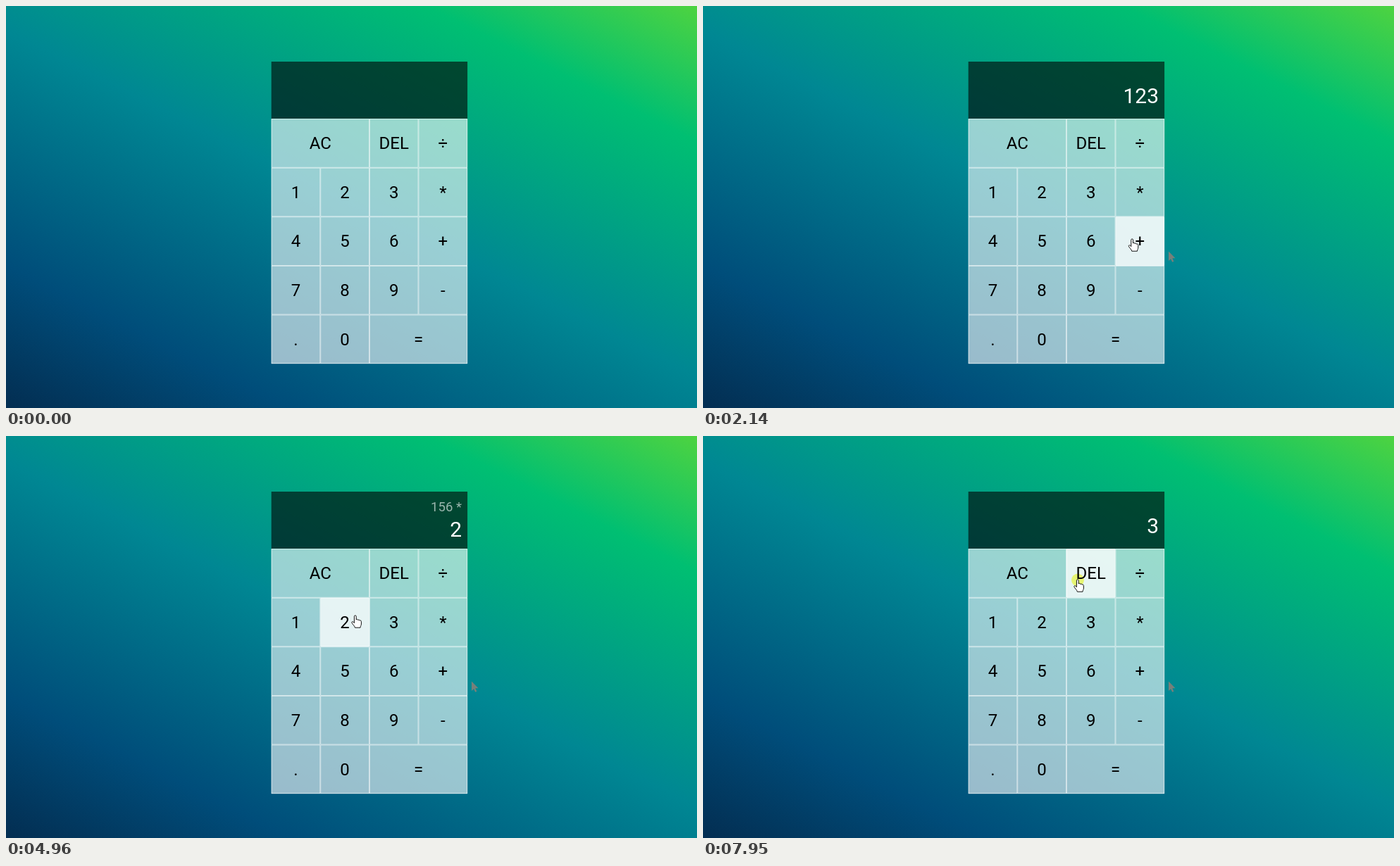
Recreate the animation shown at these times as an HTML page with a canvas. Size 981x571 px, loop 8 s.

```html
<!DOCTYPE html>
<html lang="en">
<head>
<meta charset="utf-8">
<title>Calculator</title>
<style>
html, body { margin: 0; width: 100%; height: 100%; overflow: hidden; background: #008793; }
canvas { display: block; }
</style>
</head>
<body>
<canvas id="stage" width="981" height="571"></canvas>
<script>
const ctx = document.getElementById('stage').getContext('2d');
const LOOP = 8000, STEP = 66.9, ENTER = 120, HOLD = 70;
const LEFT = 376.7, TOP = 79, KEYS_TOP = 160.1, CELL = 69.6, WIDTH = 4 * CELL;

// Each name fills as many columns as it appears in its row.
const rows = ['AC AC DEL ÷', '1 2 3 *', '4 5 6 +', '7 8 9 -', '. 0 = ='];
const keys = rows.flatMap((row, r) => {
  const names = row.split(' ');
  return [...new Set(names)].map(label => ({
    label,
    x: LEFT + names.indexOf(label) * CELL,
    y: KEYS_TOP + r * CELL,
    w: names.filter(n => n === label).length * CELL
  }));
});

// Pointer stops: depart, arrive, x, y, then the times of any presses
const stops = [
  [120, 650, 455, 216],
  [650, 860, 422, 264, 990],
  [1060, 1240, 484, 270, 1260],
  [1340, 1520, 533, 273, 1530],
  [1610, 2190, 612, 333, 2270],
  [2340, 2610, 566, 263, 2680, 2880],
  [3210, 3680, 620, 266, 3750],
  [4020, 4620, 496, 255, 4830],
  [5290, 5800, 590, 462, 5830],
  [6060, 6900, 525, 214],
  [6910, 7060, 532, 204, 7200, 7680, 7950]
];

// Keys that stay lit for a while after the pointer leaves
const afterglow = [
  { label: '2', from: 5300, to: 5960, alpha: 0.79 },
  { label: '=', from: 5890, to: 7210, alpha: 0.9 }
];

const keyAt = (x, y) =>
  keys.find(k => x >= k.x && x < k.x + k.w && y >= k.y && y < k.y + CELL);

const presses = stops.flatMap(([, , x, y, ...times]) =>
  times.map(time => ({ time, label: keyAt(x, y).label })));

function pointerAt(t) {
  let x = 940, y = 556;
  for (const [depart, arrive, toX, toY] of stops) {
    const u = Math.min(1, Math.max(0, (t - depart) / (arrive - depart)));
    const e = u * u * (3 - 2 * u);
    x += (toX - x) * e;
    y += (toY - y) * e;
  }
  return { x, y };
}

function compute(a, op, b) {
  if (op === '+') return a + b;
  if (op === '-') return a - b;
  return op === '*' ? a * b : a / b;
}

function screenAt(t) {
  let current = '', previous = '', op = '';
  for (const { time, label } of presses) {
    if (t < time + HOLD) break;
    if (/[\d.]/.test(label)) {
      current += label;
    } else if (label === 'DEL') {
      current = current.slice(0, -1);
    } else {
      const value = op ? String(compute(+previous, op, +current)) : current;
      const done = label === '=';
      [current, previous, op] = done ? [value, '', ''] : ['', value, label];
    }
  }
  return { upper: op && previous + ' ' + op, lower: current };
}

function drawBackground() {
  const cx = 516, cy = 294, dx = 267, dy = 534;
  const g = ctx.createLinearGradient(cx - dx, cy + dy, cx + dx, cy - dy);
  ['#051937', '#004d7a', '#008793', '#00bf72', '#86e21c'].forEach((c, i) => g.addColorStop(i / 4, c));
  ctx.fillStyle = g;
  ctx.fillRect(0, 0, 981, 571);
}

function write(text, x, y, size, color, align) {
  ctx.font = size + 'px Roboto, sans-serif';
  ctx.textAlign = align;
  ctx.fillStyle = color;
  ctx.fillText(text, x, y);
}

function drawScreen(t) {
  ctx.fillStyle = 'rgba(0,0,0,0.6)';
  ctx.fillRect(LEFT, TOP, WIDTH, KEYS_TOP - TOP);
  const { upper, lower } = screenAt(t);
  const edge = 647;
  if (upper) write(upper, edge, lower ? 107 : 115, 18.6, 'rgba(255,255,255,0.6)', 'right');
  if (lower) write(lower, edge, upper ? 142.6 : 138.2, 30, '#fff', 'right');
}

function drawKeys(t, pointer) {
  const hovered = pointer && keyAt(pointer.x, pointer.y);
  for (const k of keys) {
    const glow = afterglow.find(g => g.label === k.label && t >= g.from && t < g.to);
    const alpha = k === hovered ? 0.9 : glow ? glow.alpha : 0.6;
    ctx.fillStyle = `rgba(255,255,255,${alpha})`;
    ctx.fillRect(k.x, k.y, k.w, CELL);
    ctx.strokeStyle = 'rgba(255,255,255,0.65)';
    ctx.lineWidth = 0.9;
    ctx.strokeRect(k.x + 0.45, k.y + 0.45, k.w - 0.9, CELL - 0.9);
    write(k.label, k.x + k.w / 2, k.y + CELL / 2 + 8.2, 24, '#000', 'center');
  }
}

const arrow = new Path2D('M0 0V13.5L3.1 10.7L5.2 15.2L7.4 14.2L5.3 9.8H9.5Z');
const hand = new Path2D('M-1.6 1.2C-1.6-.6 1.2-.6 1.2 1.2V6C1.5 5 3.6 5.1 3.8 6.6' +
  'C4.3 5.7 6.1 5.9 6.2 7.3C6.8 6.6 8.4 6.9 8.4 8.5V12C8.4 14 7.2 14.8 7 17.2H-.6' +
  'C-1 14.8-3.8 12.7-5 10.4C-5.6 8.9-4 8.1-2.9 9.2L-1.6 10.6Z');

function drawShape(shape, x, y, fill, stroke) {
  ctx.save();
  ctx.translate(x, y);
  ctx.fillStyle = fill;
  ctx.fill(shape);
  if (stroke) {
    ctx.strokeStyle = stroke;
    ctx.lineJoin = 'round';
    ctx.lineWidth = 1;
    ctx.stroke(shape);
  }
  ctx.restore();
}

function drawPressMark({ x, y }) {
  ctx.save();
  ctx.globalCompositeOperation = 'multiply';
  ctx.fillStyle = '#ffff78';
  ctx.beginPath();
  ctx.arc(x, y + 0.5, 9, 0, Math.PI * 2);
  ctx.fill();
  ctx.restore();
}

function drawPointer(t, pointer) {
  const { x, y } = pointer;
  if (presses.some(p => t >= p.time && t < p.time + HOLD)) drawPressMark(pointer);
  drawShape(keyAt(x, y) ? hand : arrow, x, y, '#fff', '#111');
}

function draw(t) {
  // The pointer moves in steps, like a screen recording.
  const tick = ENTER + Math.floor((t - ENTER + 15) / STEP) * STEP;
  const pointer = t >= ENTER ? pointerAt(tick) : null;
  drawBackground();
  drawScreen(t);
  drawKeys(t, pointer);
  if (t >= 460) drawShape(arrow, 661, 348.5, '#78807a');
  if (pointer) drawPointer(t, pointer);
}

const start = performance.now();
function frame() {
  draw((performance.now() - start) % LOOP);
  requestAnimationFrame(frame);
}
draw(0);
requestAnimationFrame(frame);
</script>
</body>
</html>
```
